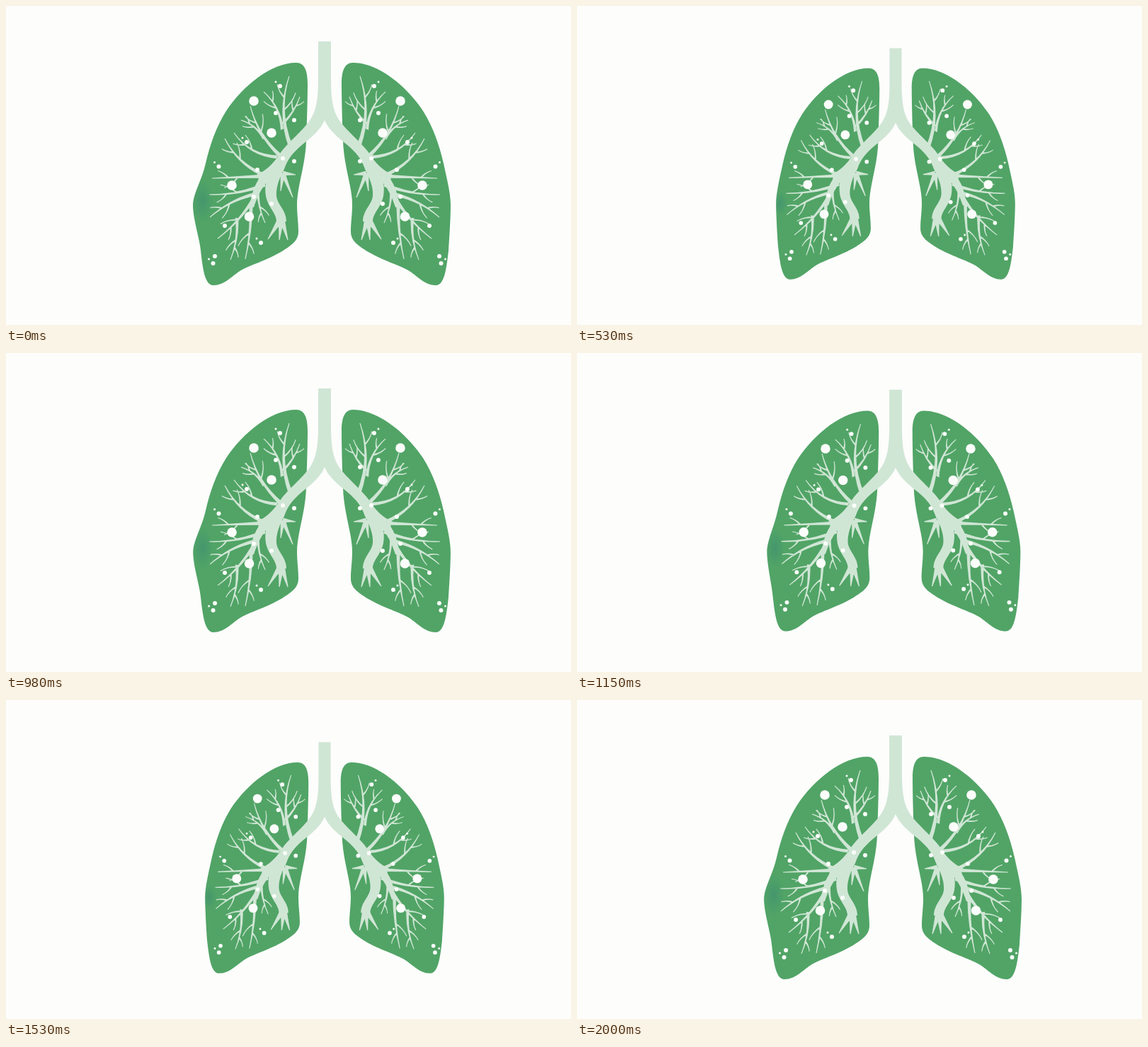
Write an HTML page that moves like this. It is 798 px wide and 450 px high and loops after 2020 ms.

```html
<!DOCTYPE html>
<html lang="en">
<head>
<meta charset="utf-8">
<title>Breathing lungs</title>
<style>
  html, body { margin: 0; width: 100%; height: 100%; overflow: hidden; background: #fdfdfc; }
  svg { display: block; width: 100vw; height: 100vh; }
</style>
</head>
<body>
<svg viewBox="0 0 798 450">
  <defs>
    <clipPath id="lungClip"><path class="leftLung"/></clipPath>
    <radialGradient id="bruise">
      <stop offset="0" stop-color="#3f9070" stop-opacity=".7"/>
      <stop offset="1" stop-color="#3f9070" stop-opacity="0"/>
    </radialGradient>
    <g id="tree" fill="#d0e6d5">
      <path d="M441,50H450.5V160C444,176 430,186 418,196C404,208 398,216 393,230C386,243 381,256 382,268C383,280 396,288 396,304L382,304C382,292 370,284 367,268C366,262 366,256 367,250C358,262 354,272 350,284L344,284C346,268 350,255 356,246C358,240 356,238 354,238C368,232 378,222 387,208C395,196 412,182 424,168C438,152 441,135 441,100Z"/>
      <path id="branches"/>
    </g>
    <g id="dots" fill="#fbfdfa"></g>
  </defs>
  <g id="lungs">
    <g fill="#51a466">
      <path class="leftLung"/>
      <path id="rightLung" transform="translate(900 0) scale(-1 1)"/>
    </g>
    <g clip-path="url(#lungClip)"><ellipse id="shade" cx="278" fill="url(#bruise)"/></g>
    <use href="#tree"/>
    <use href="#tree" transform="translate(900 0) scale(-1 1)"/>
    <use href="#dots"/>
    <use href="#dots" transform="translate(907 0) scale(-1 1)"/>
  </g>
</svg>
<script>
const PERIOD = 1010;
const byId = id => document.getElementById(id);

// Main limbs: root, tip, bow as a share of the length. Their twigs follow a rule.
const limbs = [
  [402,198, 400,99, -.18], [390,174, 364,121, .2], [391,166, 415,128, .12],
  [387,211, 345,141, -.15], [364,187, 332,161, .2], [383,213, 322,179, -.24],
  [363,238, 309,187, -.18], [367,240, 291,243, 0], [366,252, 287,266, -.1],
  [349,266, 288,298, .12], [352,268, 299,328, -.1], [326,299, 317,358, -.12],
  [346,280, 338,357, -.06], [356,258, 366,306, .12]
];
const bigDots = [[350,134], [375,179], [319,253], [343.5,297]];
const dots = [[381,151], [407,161], [407,219], [391,215], [355,231], [350,269], [375,279], [309,310], [295,353]];
const pairedDots = [[387,113], [340,192], [300.5,226.5], [360,334], [292.5,363]];

function bend([x0, y0, x1, y1, bow]) {
  const dx = x1 - x0, dy = y1 - y0;
  return { x0, y0, x1, y1, dx, dy, length: Math.hypot(dx, dy),
    cx: (x0 + x1) / 2 - dy * bow, cy: (y0 + y1) / 2 + dx * bow };
}

// A curved stroke that narrows from half width w to a fine tip.
function taper(line, w) {
  const { x0, y0, x1, y1, dx, dy, length, cx, cy } = bend(line);
  const nx = -dy / length, ny = dx / length;
  const at = (x, y, r) => `${x + nx * r},${y + ny * r}`;
  return `M${at(x0, y0, w)}Q${at(cx, cy, w * .5)} ${at(x1, y1, .6)}` +
    `L${at(x1, y1, -.6)}Q${at(cx, cy, -w * .5)} ${at(x0, y0, -w)}Z`;
}

function twig(limb, t, side) {
  const { x0, y0, x1, y1, length, cx, cy } = bend(limb);
  const mix = (a, c, b) => (1 - t) ** 2 * a + 2 * t * (1 - t) * c + t * t * b;
  const slope = (a, c, b) => (1 - t) * (c - a) + t * (b - c);
  const x = mix(x0, cx, x1), y = mix(y0, cy, y1);
  const angle = Math.atan2(slope(y0, cy, y1), slope(x0, cx, x1)) + .62 * side;
  const reach = 6 + .5 * length * (1 - t);
  return taper([x, y, x + reach * Math.cos(angle), y + reach * Math.sin(angle), .15 * side], 1.3);
}

function branch(limb) {
  const side = limb[4] < 0 ? 1 : -1;
  return taper(limb, 1 + .022 * bend(limb).length) + twig(limb, .52, side) + twig(limb, .7, -side);
}

function fan(x, y, tips, w) {
  return tips.map(([tipX, tipY]) => taper([x, y, tipX, tipY, 0], w)).join('');
}

function lungPath(bulge) {
  const x = 272 - bulge;
  return 'M410,80C422,80 426,92 426,110C426,130 425,165 424,190' +
    'C423,225 411,255 411,280C411,295 413,305 413,318' +
    'C413,332 402,338 390,346C368,359 343,366 330,374' +
    'C318,382 308,394 293,394C281,394 278,372 275,345' +
    `C274,330 ${x},300 ${x},281C${x},265 277,245 282,222` +
    'C288,196 297,170 311,148C335,112 375,80 410,80Z';
}

const circle = r => ([x, y]) => `<circle cx="${x}" cy="${y}" r="${r}"/>`;

byId('branches').setAttribute('d', limbs.map(branch).join('') +
  fan(389, 299, [[370, 329], [386, 330], [398, 330]], 4.5) +
  fan(391, 236, [[405, 270], [409, 238], [388, 261]], 3.5));
byId('dots').innerHTML = [
  ...bigDots.map(circle(6.8)),
  ...[...dots, ...pairedDots].map(circle(3)),
  ...pairedDots.map(([x, y]) => [x - 6, y - 6]).map(circle(1.5))
].join('');
byId('rightLung').setAttribute('d', lungPath(0));
const leftLungs = document.querySelectorAll('.leftLung');

function draw(time) {
  const breath = (1 + Math.cos(2 * Math.PI * time / PERIOD)) / 2;
  const scale = .948 + .052 * breath;
  byId('lungs').setAttribute('transform', `translate(450 232) scale(${scale}) translate(-450 -232)`);
  const outline = lungPath(8 * breath * breath);
  leftLungs.forEach(lung => lung.setAttribute('d', outline));
  const shade = byId('shade');
  shade.setAttribute('cy', 281 - 6 * breath);
  shade.setAttribute('rx', 11 + 4 * breath);
  shade.setAttribute('ry', 18 + 11 * breath);
}

const start = performance.now();
function tick() {
  draw((performance.now() - start) % (2 * PERIOD));
  requestAnimationFrame(tick);
}
tick();
</script>
</body>
</html>
```
